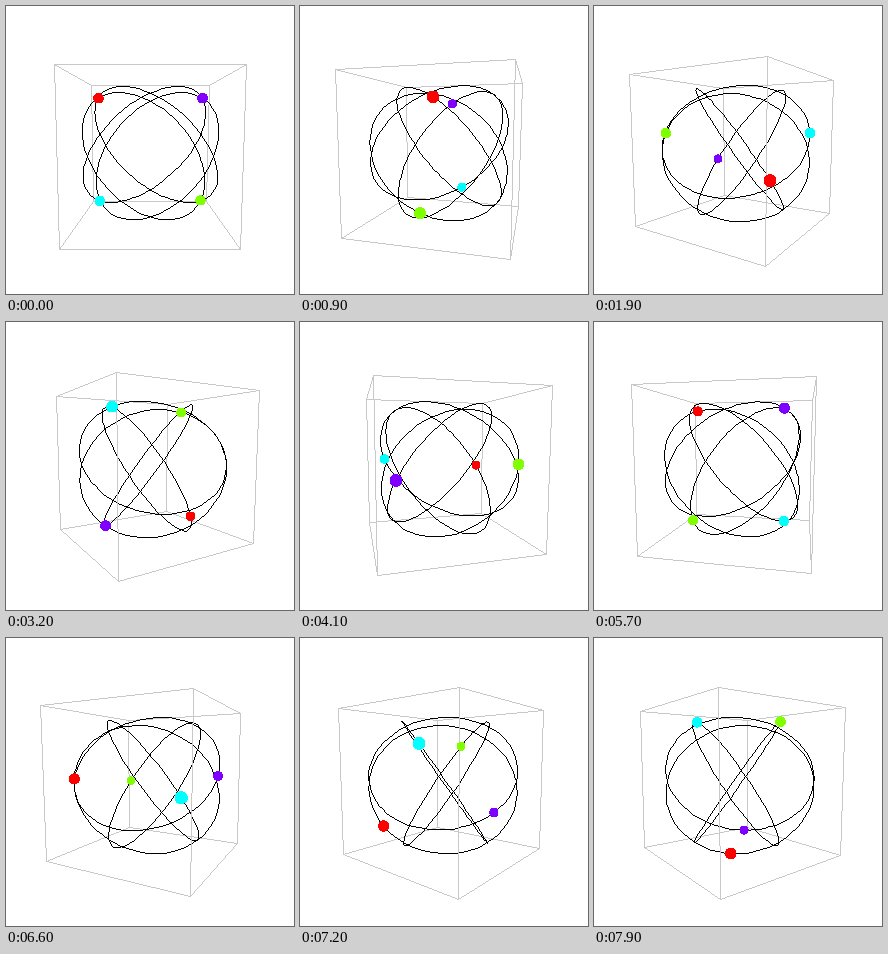
Animation of 288x288 px, one loop 8 s. Source, as a matplotlib script:

```python
import itertools
import numpy as np
import matplotlib.pyplot as plt
from matplotlib.animation import FuncAnimation
from matplotlib.collections import PolyCollection
from matplotlib.patches import Circle

SIZE, FRAMES, STEP = 288, 80, 100
CX, CY = 144.3, 144.3
FOCAL, DIST = 301.0, 4.221          # perspective, in half box sides
ELEV = np.arctan(0.1)
WIDE, DEEP, TALL = 1.035, 0.575, 0.833   # extent of a tilted orbit
SPIN, ORBIT = 1.8, 7.2              # degrees per frame
BALL = 0.065
SQUARE = np.array([(0, 0), (1, 0), (1, 1), (0, 1)])

# colour, azimuth of the orbit's normal, start phase, direction
BALLS = [
    ("#ff0000", 135, -60, -1),
    ("#80ff00", 45, 60, 1),
    ("#00ffff", 225, 60, 1),
    ("#8000ff", 315, -60, -1),
]


def orbit(azimuth, phase):
    """Points (x, y, z) of a tilted orbit; x is right, y is to the viewer."""
    a, t = np.radians(azimuth), np.radians(phase)
    side, out = WIDE * np.cos(t), DEEP * np.sin(t)
    x = side * np.cos(a) + out * np.sin(a)
    y = -side * np.sin(a) + out * np.cos(a)
    return np.array([x, y, -TALL * np.sin(t)])


def project(p, frame):
    """Screen x, y and depth of points after the scene has turned."""
    s = np.radians(SPIN * frame)
    x, y, z = p
    u = x * np.cos(s) - y * np.sin(s)
    w = x * np.sin(s) + y * np.cos(s)
    up = z * np.cos(ELEV) - w * np.sin(ELEV)
    depth = DIST - w * np.cos(ELEV) - z * np.sin(ELEV)
    return CX + FOCAL * u / depth, CY - FOCAL * up / depth, depth


def raster(xs, ys):
    """Pixels of a jagged line, one pixel wide, through the given points."""
    px, py = np.floor(xs), np.floor(ys)
    runs = []
    for x0, y0, x1, y1 in zip(px, py, px[1:], py[1:]):
        n = int(max(abs(x1 - x0), abs(y1 - y0))) + 1
        runs.append(np.column_stack([np.linspace(x0, x1, n),
                                     np.linspace(y0, y1, n)]))
    return np.unique(np.floor(np.vstack(runs) + 0.5), axis=0)


def ink(color, zorder):
    pixels = PolyCollection([], facecolors=color, linewidths=0,
                            antialiaseds=False, zorder=zorder)
    return ax.add_collection(pixels, autolim=False)


def fill(layer, lines):
    layer.set_verts(np.vstack(lines)[:, None, :] + SQUARE)


fig = plt.figure(figsize=(SIZE / 100, SIZE / 100), dpi=100, facecolor="white")
ax = fig.add_axes([0, 0, 1, 1])
ax.set_xlim(0, SIZE)
ax.set_ylim(SIZE, 0)
ax.axis("off")

corners = list(itertools.product((-1, 1), repeat=3))
edges = [np.array([a, b]).T for a, b in itertools.combinations(corners, 2)
         if sum(i != j for i, j in zip(a, b)) == 1]
curves = [orbit(az, np.linspace(0, 360, 73)) for _, az, _, _ in BALLS]

back, wires, front = ink("#c8c8c8", 0), ink("black", 1), ink("#c8c8c8", 2)
dots = [ax.add_patch(Circle((0, 0), 1, fc=c, ec="none", antialiased=False))
        for c, *_ in BALLS]


def update(frame):
    far, near = [], []
    for edge in edges:
        x, y, depth = project(edge, frame)
        (far if depth.mean() > DIST else near).append(raster(x, y))
    fill(back, far)
    fill(front, near)
    fill(wires, [raster(*project(c, frame)[:2]) for c in curves])
    for dot, (_, az, start, way) in zip(dots, BALLS):
        x, y, depth = project(orbit(az, start + way * ORBIT * frame), frame)
        dot.center = x, y
        dot.set_radius(FOCAL * BALL / depth)
        dot.set_zorder(20 - depth)
    return []


anim = FuncAnimation(fig, update, frames=FRAMES, interval=STEP,
                     repeat=True, repeat_delay=0, blit=False)
plt.show()
```
